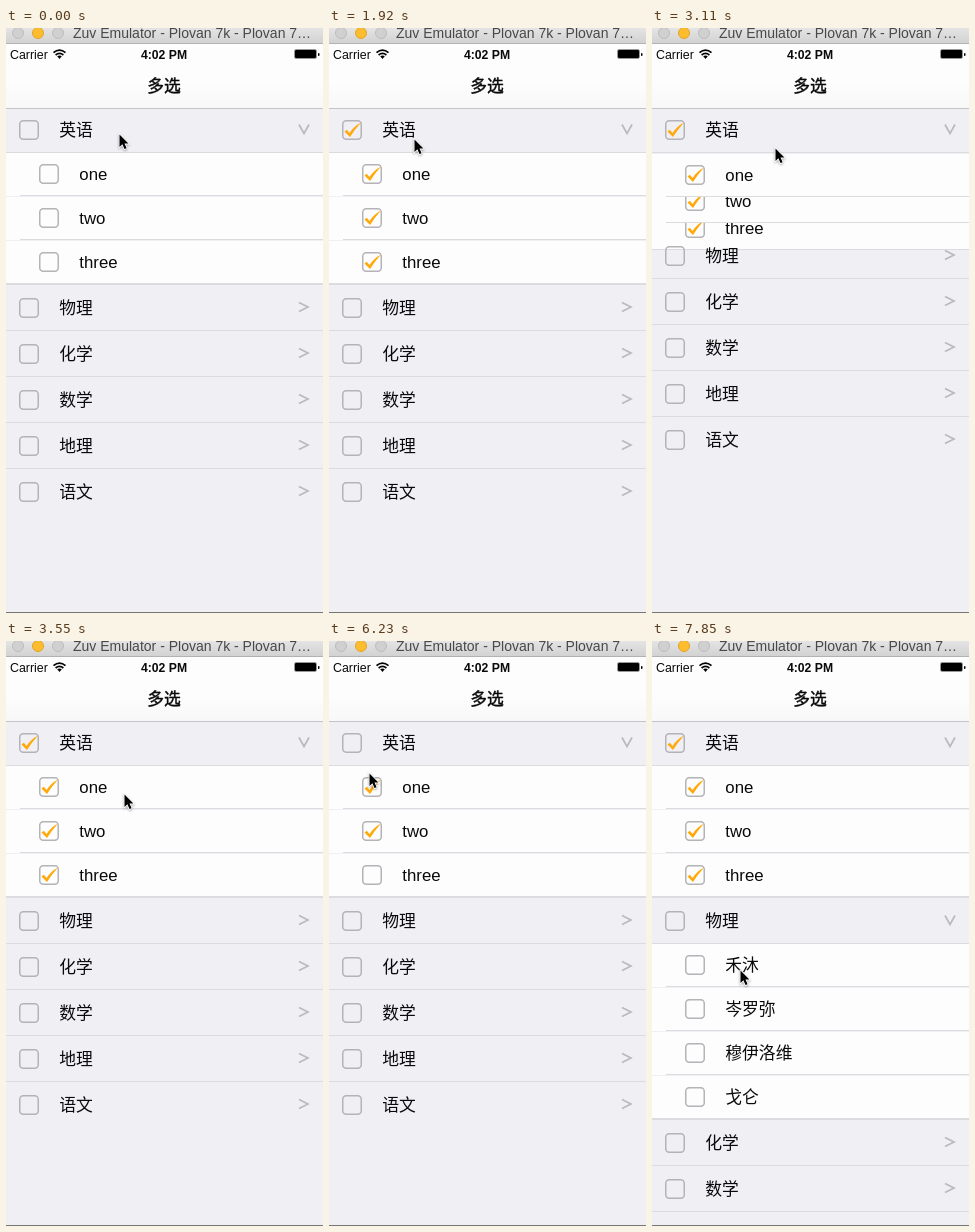
Recreate the animation shown at these times as an HTML page. Size 317 by 585 pixels, loop 7990 ms.

```html
<!DOCTYPE html>
<html lang="zh-Hans">
<head>
<meta charset="utf-8">
<title>多选</title>
<style>
  html, body { margin: 0; width: 100%; height: 100%; overflow: hidden; background: #efeff4; }
  svg { display: block; width: 317px; height: 585px; }
  text { font: 300 16.8px "Liberation Sans", "Noto Sans CJK SC", "Noto Sans CJK", sans-serif; fill: #0a0a0a; }
  .line { fill: #dcdce0; }
  .box { fill: none; stroke: #b3b3b8; stroke-width: 1.5; }
  .tick { fill: #ffa90a; }
  .chevron { fill: none; stroke: #b9b9be; stroke-width: 1.7; }
  #window { font-size: 14px; fill: #484848; }
  #carrier { font-size: 12.4px; }
  #clock { font-size: 12.2px; font-weight: bold; text-anchor: middle; }
  #title { font-weight: 500; text-anchor: middle; stroke: #0a0a0a; stroke-width: .4px; }
  #wifi path { fill: none; stroke: #000; stroke-width: 1.7; }
  #cursor { stroke: #fff; stroke-width: 1.6; paint-order: stroke; filter: drop-shadow(0 1px 1px #0005); }
</style>
</head>
<body>
<svg viewBox="0 0 317 585">
  <defs>
    <linearGradient id="chrome" x2="0" y2="1">
      <stop stop-color="#e4e4e4"/><stop offset="1" stop-color="#d2d2d2"/>
    </linearGradient>
    <linearGradient id="bar" x2="0" y2="1">
      <stop offset=".6" stop-color="#fdfdfd"/><stop offset="1" stop-color="#f8f8f9"/>
    </linearGradient>
  </defs>
  <rect width="317" height="585" fill="#efeff4"/>
  <g id="backs"></g>
  <g id="rows"></g>
  <g id="heads"></g>

  <rect y="15" width="317" height="65" fill="url(#bar)"/>
  <rect y="80" width="317" height="1" fill="#c4c4c8"/>
  <rect width="317" height="15" fill="url(#chrome)"/>
  <rect y="15" width="317" height="1" fill="#b2b2b2"/>
  <circle cx="12" cy="5" r="5.5" fill="#d0d0d0" stroke="#bcbcbc"/>
  <circle cx="32" cy="5" r="5.5" fill="#fdbd2e" stroke="#e3a428"/>
  <circle cx="52" cy="5" r="5.5" fill="#d0d0d0" stroke="#bcbcbc"/>
  <text id="window" x="67" y="10">Zuv Emulator - Plovan 7k - Plovan 7…</text>
  <text id="carrier" x="4" y="31">Carrier</text>
  <g id="wifi">
    <path d="M47.5 24.6Q53.5 19.6 59.5 24.6M49.6 27Q53.5 23.7 57.4 27"/>
    <path d="M51.2 28.2Q53.5 26.6 55.8 28.2L53.5 31Z" style="fill:#000;stroke:none"/>
  </g>
  <text id="clock" x="158" y="31">4:02 PM</text>
  <rect x="288.5" y="21.5" width="22" height="9" rx="1.5" fill="none" stroke="#999"/>
  <rect x="289" y="22" width="21" height="8" rx="1"/>
  <rect x="312" y="25" width="1.500" height="3" rx=".7"/>
  <text id="title" x="158" y="64">多选</text>
  <rect y="584" width="317" height="1" fill="#777"/>
  <path id="cursor" d="M.5 1.500v12.500l2.900-2.700 2.100 4.800 2.100-.9-2.100-4.600h3.900z"/>
</svg>
<script>
// The screen refreshes in even steps after a short hold
const LOOP = 7990, HOLD = 290, STEP = 148.2;
const TOP = 78, HEAD = 46, ROW = 44;
const sections = [
  { name: '英语', items: ['one', 'two', 'three'], taps: [-9, 14, 19] },
  { name: '物理', items: ['禾沐', '岑罗弥', '穆伊洛维', '戈仑'], taps: [50] },
  ...['化学', '数学', '地理', '语文'].map(name => ({ name, items: [], taps: [] }))
];
// Steps at which each child of the first section is ticked or cleared
const toggles = [[9, 25, 40], [9, 29, 37], [9, 34, 46]];
// Cursor stops: step, x, y
const stops = [
  [0, 113, 105], [8, 26, 105], [15, 124, 113], [19, 124, 113], [23, 118, 152],
  [24, 46, 149], [28, 44, 192], [32, 46, 231], [33, 46, 231], [37, 44, 190],
  [41, 40, 131], [46, 45, 230], [49, 102, 284], [52, 88, 328]
];

const $ = id => document.getElementById(id);
const mix = (a, b, f) => a + (b - a) * f;
const isOn = (steps, n) => steps.filter(s => n >= s).length % 2 === 1;
const move = (el, x, y) => el.setAttribute('transform', `translate(${x} ${y})`);
const show = (el, on) => { el.style.display = on ? '' : 'none'; };

function smooth(f) {
  f = Math.max(0, Math.min(1, f));
  return f * f * (3 - 2 * f);
}

// Each tap slides the section open or shut in about two steps
const openness = (taps, n) =>
  taps.reduce((open, tap, i) => mix(open, 1 - i % 2, smooth((n - tap + .2) / 2.1)), 0);

function cursorAt(n) {
  const i = Math.max(1, stops.findIndex(s => s[0] >= n));
  const [n0, x0, y0] = stops[i - 1], [n1, x1, y1] = stops[i];
  const f = smooth((n - n0) / (n1 - n0));
  return [Math.round(mix(x0, x1, f)), Math.round(mix(y0, y1, f))];
}

function add(parent, tag, attrs = {}, text = '') {
  const el = document.createElementNS('http://www.w3.org/2000/svg', tag);
  for (const k in attrs) el.setAttribute(k, attrs[k]);
  el.textContent = text;
  return parent.appendChild(el);
}

function addLine(g, y, x = 0) {
  return add(g, 'rect', { class: 'line', x, y, width: 317, height: 1 });
}

function addLabel(g, x, y, label) {
  add(g, 'rect', { class: 'box', x: x - 9.25, y: y - 9.25, width: 18.5, height: 18.5, rx: 3.5 });
  add(g, 'text', { x: x + 30.3, y: y + 5.8 }, label);
  return add(g, 'path', {
    class: 'tick', transform: `translate(${x} ${y})`,
    d: 'M-7.500 1.500L-5.200 -.2L-2.500 3Q2 -3.800 9 -7.500Q2.500 -.2 -2 7Z'
  });
}

const views = sections.map(({ name, items, taps }) => {
  const back = add($('backs'), 'g');
  add(back, 'rect', { width: 317, height: HEAD, fill: '#efeff4' });
  addLine(back, 0);
  const foot = addLine(back, HEAD);
  const head = add($('heads'), 'g');
  const tick = addLabel(head, 23, 24, name);
  const chevron = add(head, 'path', { class: 'chevron' });
  const rows = items.map((item, i) => {
    const g = add($('rows'), 'g');
    add(g, 'rect', { y: 1, width: 317, height: ROW - 1, fill: '#fdfdfd' });
    addLine(g, ROW - 1, i < items.length - 1 ? 14 : 0);
    return { g, tick: addLabel(g, 43, 22, item) };
  });
  // Earlier rows cover later ones
  rows.slice().reverse().forEach(r => $('rows').append(r.g));
  return { taps, back, head, foot, tick, chevron, rows };
});

function draw(t) {
  const n = t < HOLD ? 0 : 1 + Math.floor((t - HOLD) / STEP);
  const checks = toggles.map(s => isOn(s, n));
  let y = TOP;
  views.forEach((v, s) => {
    const open = openness(v.taps, n);
    move(v.back, 0, y);
    move(v.head, 0, y);
    show(v.foot, open > 0);
    show(v.tick, s === 0 && checks.every(Boolean));
    v.chevron.setAttribute('d', isOn(v.taps, n)
      ? 'M293 18.5L298 27.5L303 18.5' : 'M293 18.5L302 23L293 27.5');
    v.rows.forEach((r, i) => {
      show(r.g, open > 0);
      show(r.tick, s === 0 && checks[i]);
      r.g.style.opacity = Math.min(1, open * 3);
      move(r.g, 0, Math.round(y + HEAD + ROW * i * open + (1 - open) * 1.5));
    });
    y = Math.round(y + HEAD + ROW * v.rows.length * open);
  });
  move($('cursor'), ...cursorAt(n));
}

const start = performance.now();
function frame() {
  draw((performance.now() - start) % LOOP);
  requestAnimationFrame(frame);
}
frame();
</script>
</body>
</html>
```
